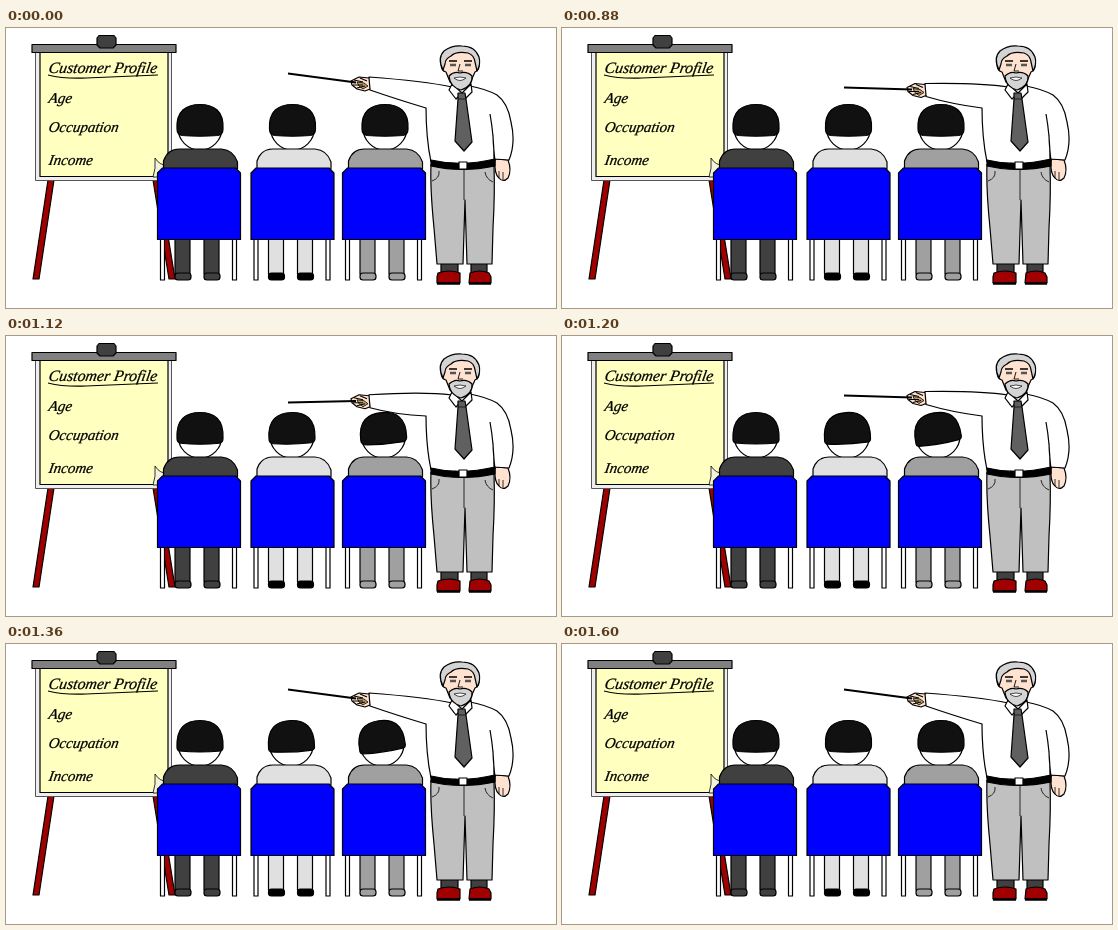
Animation of 550 by 280 pixels, one loop 2800 ms. Source, as an HTML page:

```html
<!DOCTYPE html>
<html lang="en">
<head>
<meta charset="utf-8">
<title>Customer Profile</title>
<style>
html, body { margin: 0; width: 100%; height: 100%; overflow: hidden; background: #fff; }
svg { display: block; width: 550px; height: 280px; }
text { font: italic 15px "Liberation Serif", "Times New Roman", serif; fill: #000; stroke: #000; stroke-width: .25; }
.line { fill: none; }
.skin { fill: #ffe2cf; }
.shirt { fill: #fff; }
.red { fill: #a00000; }
.sock { fill: #404040; }
.hoary { fill: #d4d4d4; }
</style>
</head>
<body>
<svg viewBox="0 0 550 280" stroke="#000" stroke-width="1.2" stroke-linejoin="round">
  <g id="easel">
    <path class="red" d="M42 152H48L33 251H27Z M147 152H153L169 251H163Z"/>
    <rect x="29.500" y="24.500" width="136" height="128" fill="#eee" stroke="#555" stroke-width="1"/>
    <rect x="34" y="24.500" width="128" height="124" fill="#ffffc0"/>
    <path d="M147 149Q150 141 149 130Q154 138 162 137V149Z" fill="#f2f2dc" stroke-width=".8"/>
    <rect x="26" y="16.500" width="144" height="8" fill="#808080"/>
    <path d="M93 7.500H108L110 10V17L107 20H94L91 17V10Z" fill="#404040"/>
    <g id="notes"></g>
    <path class="line" d="M42 47Q58 51 80 50T152 47"/>
  </g>

  <g id="teacher">
    <path class="sock" d="M435 234H452V246H435Z M465 234H481V246H465Z"/>
    <path class="red" d="M432 245Q443 241 454 245V255H431V249Z M464 245Q474 241 483 245L485 249V255H463Z"/>
    <path stroke-width="2.500" d="M431 255.500H454M463 255.500H485"/>
    <path fill="#c0c0c0" d="M425 136L488 138Q489 165 487 200L486 236H461L459 172L457 236H431L428 200Q424 160 425 136Z"/>
    <path class="line" stroke-width=".8" d="M433 143Q434 150 426 153M479 144Q480 151 487 154M458 142V172"/>
    <path class="skin" d="M489 131L502 132Q506 142 502 150Q497 155 493 150Q488 146 489 131Z"/>
    <path class="line" stroke-width=".8" d="M493 143V150M497 144V152"/>
    <path class="shirt" d="M445 58Q480 60 491 67Q502 75 505 94Q510 115 503 132L488 131L489 136H424Q424 108 420 78L424 60Z" stroke="none"/>
    <path class="line" d="M464 58Q480 61 491 67Q502 75 505 94Q510 115 503 132L488 131Q488 108 484 86M489 133Q487 115 487 107M420 79Q420 110 425 134"/>
    <path id="arm" class="shirt"/>
    <path d="M425 132Q455 139 489 131V138Q456 145 425 138Z"/>
    <rect x="453" y="134" width="8" height="7" fill="#fff"/>
    <path class="shirt" d="M446 56L456 65L465 56L466 64L460 70L456 65L450 71L443 62Z"/>
    <path fill="#606060" d="M452 65H459L460 71L466 114L458 123L449 113L452 71Z"/>
    <path class="line" stroke-width=".7" d="M452 71H460"/>
    <path class="skin" d="M438 33Q435 30 435 36Q435 43 440 44L444 54Q454 65 465 53L469 44Q474 42 473 35Q473 31 470 33Q468 22 454 22Q440 22 438 33Z"/>
    <path class="hoary" d="M437 42Q431 30 438 23Q446 17 456 18Q469 18 473 29Q475 36 471 43L469 34Q468 27 462 25Q450 23 445 28Q439 31 439 36Z"/>
    <path class="hoary" d="M443 48Q448 43 454 45Q461 43 466 48Q467 58 455 62Q444 59 443 48Z"/>
    <path fill="#fff" stroke-width=".7" d="M448 50Q454 48 460 50Q454 55 448 50Z"/>
    <path class="line" d="M443 33H451M458 33H466" stroke-width="1.600"/>
    <path class="line" d="M444 37H450M459 37H465" stroke="#555" stroke-width="2.400"/>
    <path class="line" d="M454 36L452 43H457" stroke-width=".9"/>
    <g id="hand">
      <path class="skin" d="M363 50L353 49L345 53L346 57L351 61L359 63L364 61Z"/>
      <path d="M351 54L358 55L362 58L357 61L353 58Z" fill="#bfa36c" stroke-width=".8"/>
      <path class="line" d="M348 52L357 54M347 57H357M351 60L359 58M354 50L361 53"/>
    </g>
    <path id="stick" class="line" stroke-width="2"/>
  </g>
  <g id="students"></g>
</svg>
<script>
const get = id => document.getElementById(id);

get("notes").innerHTML = [["Customer Profile", 45, 15.8], ["Age", 75, 15], ["Occupation", 104, 15], ["Income", 137, 15]]
  .map(([s, y, size]) => `<text transform="translate(42 ${y}) skewX(-10)" style="font-size:${size}px">${s}</text>`).join("");

// x: chair middle, head: head middle, tilt and slide: how far the head leans
const people = [
  { x: 193.5, head: 194, suit: "#404040", shoe: "#404040", tilt: 0, slide: 0 },
  { x: 287, head: 286.5, suit: "#e0e0e0", shoe: "#000", tilt: -4, slide: -1.5 },
  { x: 378.5, head: 379, suit: "#a0a0a0", shoe: "#a0a0a0", tilt: -13, slide: -4 }
];

const leg = (x, p) => `<rect x="${x - 7.5}" y="205" width="15" height="41" fill="${p.suit}"/>
  <rect x="${x - 7.5}" y="245" width="16" height="7" rx="3" fill="${p.shoe}"/>`;
const post = x => `<rect x="${x}" y="205" width="4" height="47" fill="#fff"/>`;

get("students").innerHTML = people.map(p => `
  ${leg(p.x - 17, p)}${leg(p.x + 12, p)}${post(p.x - 39)}${post(p.x + 33)}
  <g class="head"><circle cy="100" r="22" fill="#fff"/><path class="hair" fill="#111"/></g>
  <g transform="translate(${p.x} 0)">
    <path fill="${p.suit}" d="M-36 141V133Q-32 121 -20 121H22Q34 122 38 134V141Z"/>
    <path fill="#00f" d="M-42 145L-37 140H36L41 145V211.500H-42Z"/>
  </g>`).join("");

const heads = [...document.querySelectorAll(".head")];
const hairs = [...document.querySelectorAll(".hair")];

// start time, pointer drop, hair edge, lean
const steps = [
  [0, 0, 0, 0], [800, .25, 0, 0], [880, .5, 0, 0], [960, .75, 0, 0], [1040, 1, 0, 0],
  [1120, .75, .5, .35], [1200, .5, 1, .75], [1280, .25, 1, 1], [1360, 0, 1, .65],
  [1440, 0, 1, .3], [1520, 0, .5, .1], [1600, 0, 0, 0]
];

function hairPath(u) {
  const side = 101 + 3 * u, edge = 107.5 - u / 2, w = 18 + 3 * u;
  return `M-23 ${side}C-24 83 -14 76.5 0 76.5S24 83 23 ${side}Q23 ${edge - 1} ${w} ${edge}Q0 109 ${-w} ${edge}Q-23 ${edge - 1} -23 ${side}Z`;
}

function draw(time) {
  const [, drop, edge, lean] = steps.findLast(s => s[0] <= time % 2800);
  const dy = 13 * drop;
  get("hand").setAttribute("transform", `translate(0 ${dy})`);
  get("stick").setAttribute("d", `M282 ${45.5 + 28 * drop}L350 ${54.5 + 14 * drop}`);
  get("arm").setAttribute("d",
    `M446 59Q418 ${53 + dy * .25} 363 ${49 + dy}Q361 ${55 + dy} 364 ${62 + dy}Q390 ${71 + dy * .8} 420 80`);
  people.forEach((p, i) => {
    const slide = p.slide * Math.max(lean, edge * .75);
    heads[i].setAttribute("transform", `translate(${p.head + slide} 0)`);
    hairs[i].setAttribute("transform", `rotate(${p.tilt * lean} 0 100)`);
    hairs[i].setAttribute("d", hairPath(edge));
  });
}

function tick() {
  draw(performance.now());
  requestAnimationFrame(tick);
}
tick();
</script>
</body>
</html>
```
